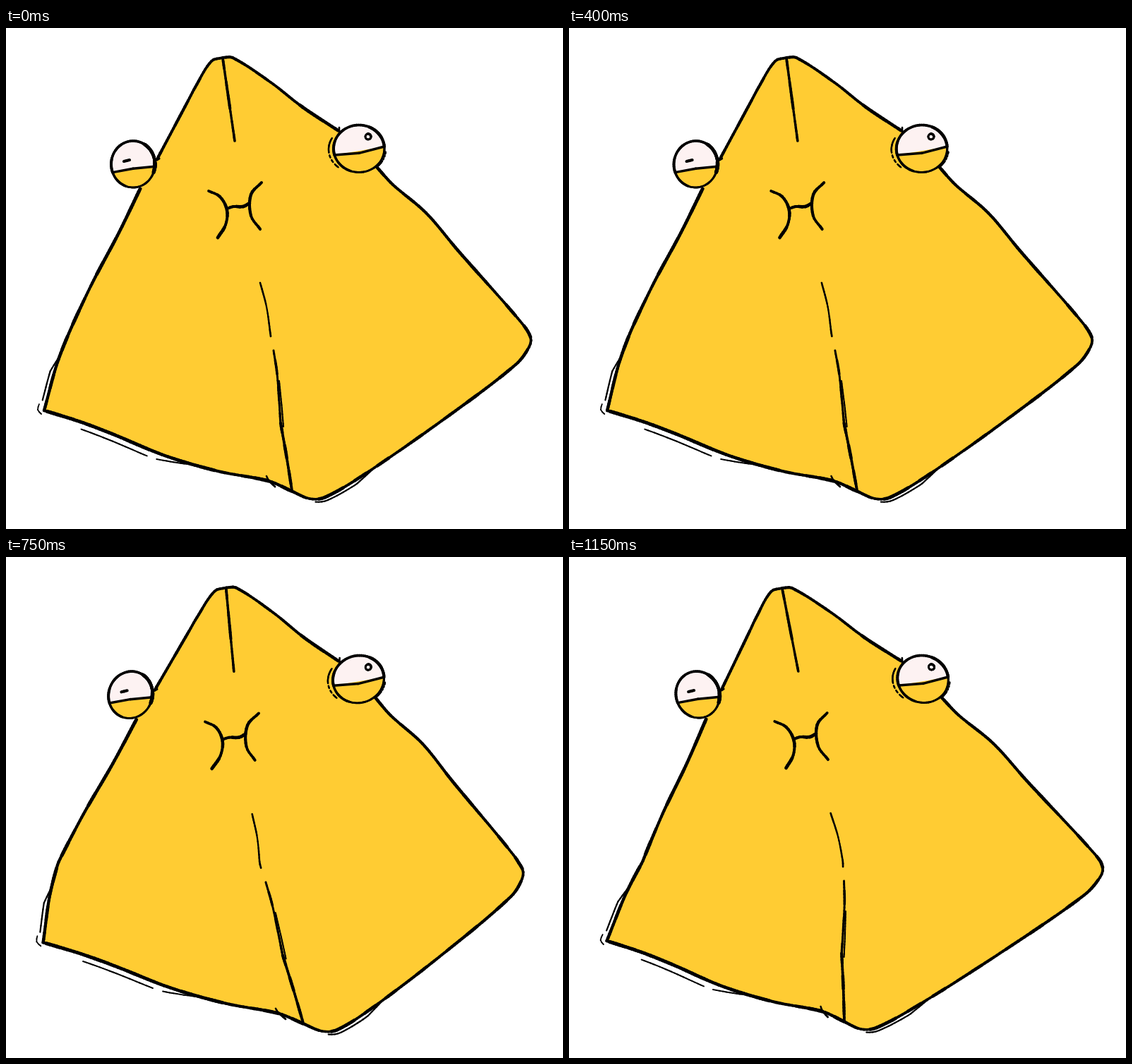
These frames come from a looping animation (789x710 px, 1200 ms). An HTML page with a canvas:

```html
<!DOCTYPE html>
<html lang="en">
<head>
<meta charset="utf-8">
<title>Wobbling pyramid</title>
<style>
html, body { margin: 0; width: 100%; height: 100%; overflow: hidden; background: #fff; }
canvas { display: block; }
</style>
</head>
<body>
<canvas id="stage" width="789" height="710"></canvas>
<script>
const ctx = document.getElementById('stage').getContext('2d');
const YELLOW = '#ffcc33', WHITE = '#fdf2f2', INK = '#000';
const LOOP = 1200, STEP = 50;
const CENTER = [390, 315], FOLD = 430;

// time, swell, bend, lift
const keys = [
  [0, 0, 0, 0],
  [150, 1.1, 2.3, -6],
  [200, 1.2, 2.3, -6],
  [300, 0.3, 0.85, 2],
  [400, 0, 0.2, 0],
  [500, 0.9, -0.35, 1],
  [590, 1.3, -0.8, 1],
  [750, 0.12, 1.05, 3],
  [950, 1, 0.08, 1],
  [1000, 1.4, 0, 1],
  [1100, 0, -0.95, 2],
  [1150, 0, -1, 2],
  [LOOP, 0, 0, 0]
];

function poseAt(t) {
  const i = keys.findIndex(k => k[0] > t);
  const a = keys[i - 1], b = keys[i], u = (t - a[0]) / (b[0] - a[0]);
  const ease = u * u * (3 - 2 * u);
  return a.map((v, n) => v + (b[n] - v) * ease).slice(1);
}

let pose = [0, 0, 0];

// Scale about the centre, and a shear that folds along one row
function warp([x, y]) {
  const [swell, bend, lift] = pose;
  const k = 0.046 * swell;
  const shear = -14 + (y < FOLD ? (FOLD - y) * 0.049 : (y - FOLD) * 0.129);
  return [
    x + k * (x - CENTER[0]) + bend * shear,
    y + k * (y - CENTER[1]) + lift
  ];
}

const hash = n => {
  const v = Math.sin(n * 127.1 + 11.7) * 43758.5453;
  return v - Math.floor(v);
};

const unit = (a, b) => {
  const x = b[0] - a[0], y = b[1] - a[1], d = Math.hypot(x, y) || 1;
  return [x / d, y / d];
};

// Smooth curve through a few points, sampled at even spacing
function curve(text) {
  const p = text.split(' ').map(s => s.split(',').map(Number));
  const dir = p.map((_, i) => unit(p[Math.max(0, i - 1)], p[Math.min(p.length - 1, i + 1)]));
  const out = [p[0]];
  for (let i = 0; i < p.length - 1; i++) {
    const a = p[i], b = p[i + 1], d = Math.hypot(b[0] - a[0], b[1] - a[1]);
    const n = Math.ceil(d / 5);
    for (let j = 1; j <= n; j++) {
      const u = j / n, v = 1 - u;
      out.push([0, 1].map(c =>
        v * v * v * a[c] + 3 * v * v * u * (a[c] + dir[i][c] * d / 3) +
        3 * v * u * u * (b[c] - dir[i + 1][c] * d / 3) + u * u * u * b[c]));
    }
  }
  return out;
}

function arc(cx, cy, rx, ry, from = 0, to = Math.PI * 2) {
  return Array.from({ length: 41 }, (_, i) => {
    const a = from + (to - from) * i / 40;
    return [cx + rx * Math.cos(a), cy + ry * Math.sin(a)];
  });
}

function fill(points, color) {
  ctx.beginPath();
  points.forEach(p => ctx.lineTo(...warp(p)));
  ctx.fillStyle = color;
  ctx.fill();
}

// Pen line of uneven weight
function pen(points, w) {
  const p = points.map(warp);
  for (let i = 1; i < p.length; i++) {
    ctx.lineWidth = w * (0.9 + 0.3 * hash(Math.floor(i / 4) + points.length));
    ctx.beginPath();
    ctx.moveTo(...p[i - 1]);
    ctx.lineTo(...p[i]);
    ctx.stroke();
  }
}

// Loose broken line beside part of a curve
function echo(points, dx, dy, from, to, w) {
  const n = points.length, part = points.slice(from * n | 0, to * n | 0);
  const p = part.map(([x, y], i) => {
    const grow = Math.min(1, i / part.length * 3);
    return warp([x + dx * grow, y + dy * grow]);
  });
  ctx.lineWidth = w;
  for (let i = 1; i < p.length; i++) {
    if (hash(Math.floor(i / 3) + n) < 0.2) continue;
    ctx.beginPath();
    ctx.moveTo(...p[i - 1]);
    ctx.lineTo(...p[i]);
    ctx.stroke();
  }
}

const slope = curve('307,42 321,42 375,77 420,112 470,145');
const side = curve('526,198 548,222 595,262 640,315 728,415 743,438 741,452 722,477 625,551 510,631 452,665 430,667 404,656');
const base = curve('404,656 372,642 300,628 225,606 150,575 105,558 54,542');
const left = curve('54,542 76,465 118,370 160,290 190,228');
const brow = curve('214,186 258,103 268,84 291,47 307,42');
const body = [...slope, [500, 170], ...side, ...base, ...left, ...brow];

const creases = [
  [3.4, curve('307,43 316,105 324,160')],
  [2.4, curve('360,361 369,395 375,437')],
  [3, curve('379,457 384,490 389,560')],
  [3.8, curve('389,560 397,605 405,655')],
  [2, curve('387,500 390,530 393,565')],
  [2.4, curve('369,635 372,641 381,650')]
];
const mouth = [
  [4, curve('287,231 303,239 313,258 311,279 300,297')],
  [4, curve('362,219 347,236 347,266 360,285')],
  [4, curve('313,256 322,253 336,253 345,248')]
];

// Eyeball with a heavy lid that covers the arc between two angles
function eye(cx, cy, rx, ry, lidRight, lidLeft) {
  const lid = arc(cx, cy, rx, ry, lidRight, lidLeft);
  fill(arc(cx, cy, rx, ry), WHITE);
  fill(lid, YELLOW);
  pen(arc(cx, cy, rx, ry, lidLeft, lidRight + Math.PI * 2), 3.8);
  pen(lid, 3);
  pen([lid[40], [cx, cy + ry * 0.19], lid[0]], 3.8);
}

const pupil = curve('167,189 171,188 175,187');
const joint = curve('211,188 217,185');
const hook = curve('47,533 45,541 50,547');
const tick = curve('472,141 472,150');

function draw(t) {
  pose = poseAt(t);
  ctx.fillStyle = '#fff';
  ctx.fillRect(0, 0, 789, 710);
  ctx.strokeStyle = INK;
  ctx.lineCap = ctx.lineJoin = 'round';

  fill(body, YELLOW);
  [slope, side, brow].forEach(c => pen(c, 4));
  [base, left].forEach(c => pen(c, 4.3));
  echo(base, -3, 9, 0.38, 0.85, 2);
  echo(side, 4, 4, 0.82, 0.96, 2.2);
  echo([...left].reverse(), -6, -1, 0.76, 0.97, 2.2);
  pen(hook, 1.8);
  [...creases, ...mouth].forEach(([w, c]) => pen(c, w));

  eye(180, 193, 31, 33, 0.1, Math.PI - 0.36);
  pen(arc(180, 193, 31, 33, -1, 0.35), 4.6);
  pen(joint, 3.4);
  pen(pupil, 4.5);

  eye(500, 171, 36, 33.5, -0.09, Math.PI - 0.27);
  echo(arc(498, 172, 41, 34, 2.3, 3.7), 0, 0, 0, 1, 2.4);
  echo(arc(499, 172, 39, 34, 0.1, 0.9), 0, 0, 0, 1, 2.2);
  pen(tick, 2.8);
  pen(arc(513, 154, 4, 4), 2.8);
}

const start = performance.now();
let last = -1;
function tickFrame() {
  const t = Math.floor((performance.now() - start) % LOOP / STEP) * STEP;
  if (t !== last) draw(last = t);
  requestAnimationFrame(tickFrame);
}
tickFrame();
</script>
</body>
</html>
```
